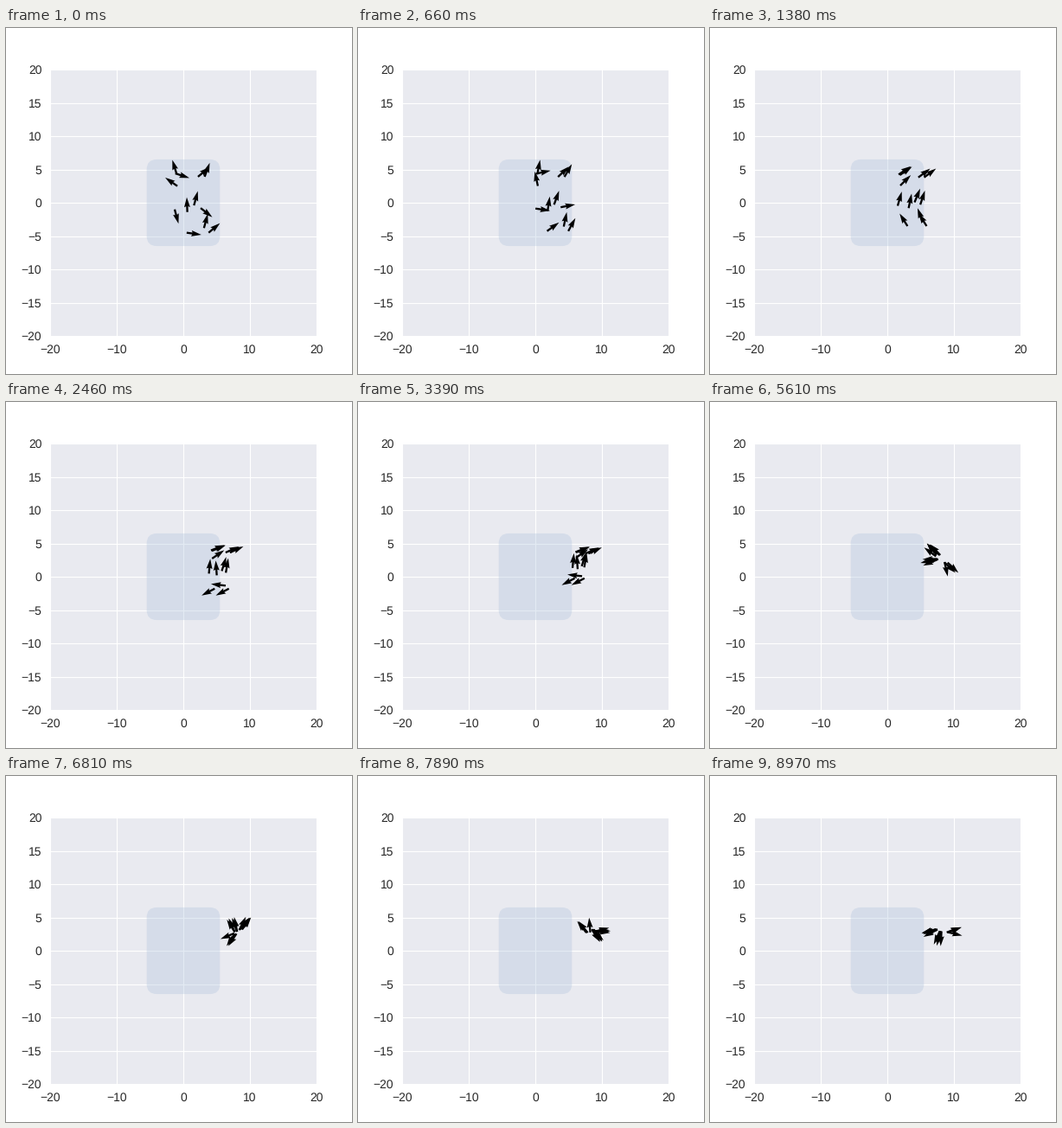
A matplotlib script that plays this animation: 400 px wide and 400 px high, repeating every 9 s.

```python
import numpy as np
import matplotlib.pyplot as plt
from matplotlib.animation import FuncAnimation
from matplotlib.patches import FancyBboxPatch

FRAMES, INTERVAL = 300, 30
HOME = 8.2, 3.0       # where the flock settles

plt.rcParams["font.family"] = "Liberation Sans"
plt.rcParams["text.hinting"] = "none"

# Starting x, y and heading in degrees of each bird
START = np.array([
    (-1.0, 4.3, 107), (-1.2, 4.4, -18), (-0.9, 2.5, 145), (2.2, 3.9, 40),
    (3.2, 3.9, 70), (0.6, -1.4, 92), (1.6, -0.4, 75), (-1.3, -1.0, -75),
    (2.6, -0.8, -38), (3.1, -3.8, 75), (0.5, -4.5, -8), (3.8, -4.5, 40),
])
x0, y0, heading0 = START.T
cx, cy = x0.mean(), y0.mean()


def smooth(u):
    u = np.clip(u, 0, 1)
    return u * u * (3 - 2 * u)


def headings(t):
    """Birds align by height, then the whole flock starts to wheel."""
    course = 62 * np.exp(-(y0 - cy) * min(t, 82) / 320)
    aligned = heading0 + (course - heading0) * smooth(t / 46)
    wheel = max(t - 120, 0)
    return np.radians(aligned + 7 * wheel * min(wheel / 67, 1))


def flock(t):
    """Tail positions and headings at step t."""
    heading = headings(t)
    gathered = 1 - np.exp(-(t / 120) ** 2)
    spread = 1 - 0.95 * gathered
    travel = np.sin(np.pi / 2 * min(t / 200, 1))
    sway = 0.8 * gathered * np.cos(heading)
    x = cx + (HOME[0] - cx) * travel + (x0 - cx) * spread + sway
    y = cy + (HOME[1] - cy) * gathered + (y0 - cy) * spread
    return np.column_stack([x, y]), heading


fig, ax = plt.subplots(figsize=(4, 4), dpi=100, facecolor="white")
ax.set(xlim=(-20, 20), ylim=(-20, 20), aspect="equal", facecolor="#e9eaf0",
       xticks=range(-20, 21, 10), yticks=range(-20, 21, 5))
ax.set_axisbelow(True)
ax.grid(color="white", linewidth=0.8)
ax.tick_params(length=0, pad=7, labelsize=10, labelcolor="0.15")
for spine in ax.spines.values():
    spine.set_visible(False)

ax.add_patch(FancyBboxPatch(
    (-5, -6), 10, 12, boxstyle="round,pad=0.5,rounding_size=1.5",
    facecolor="lightsteelblue", edgecolor="none", alpha=0.35))

tails, heading = flock(0)
arrows = ax.quiver(*tails.T, np.cos(heading), np.sin(heading),
                   units="width", scale=18, width=0.0075,
                   color="black", zorder=3)


def update(i):
    tails, heading = flock(i)
    arrows.set_offsets(tails)
    arrows.set_UVC(np.cos(heading), np.sin(heading))
    return arrows,


anim = FuncAnimation(fig, update, frames=FRAMES, interval=INTERVAL,
                     repeat=True, repeat_delay=0)
plt.show()
```
